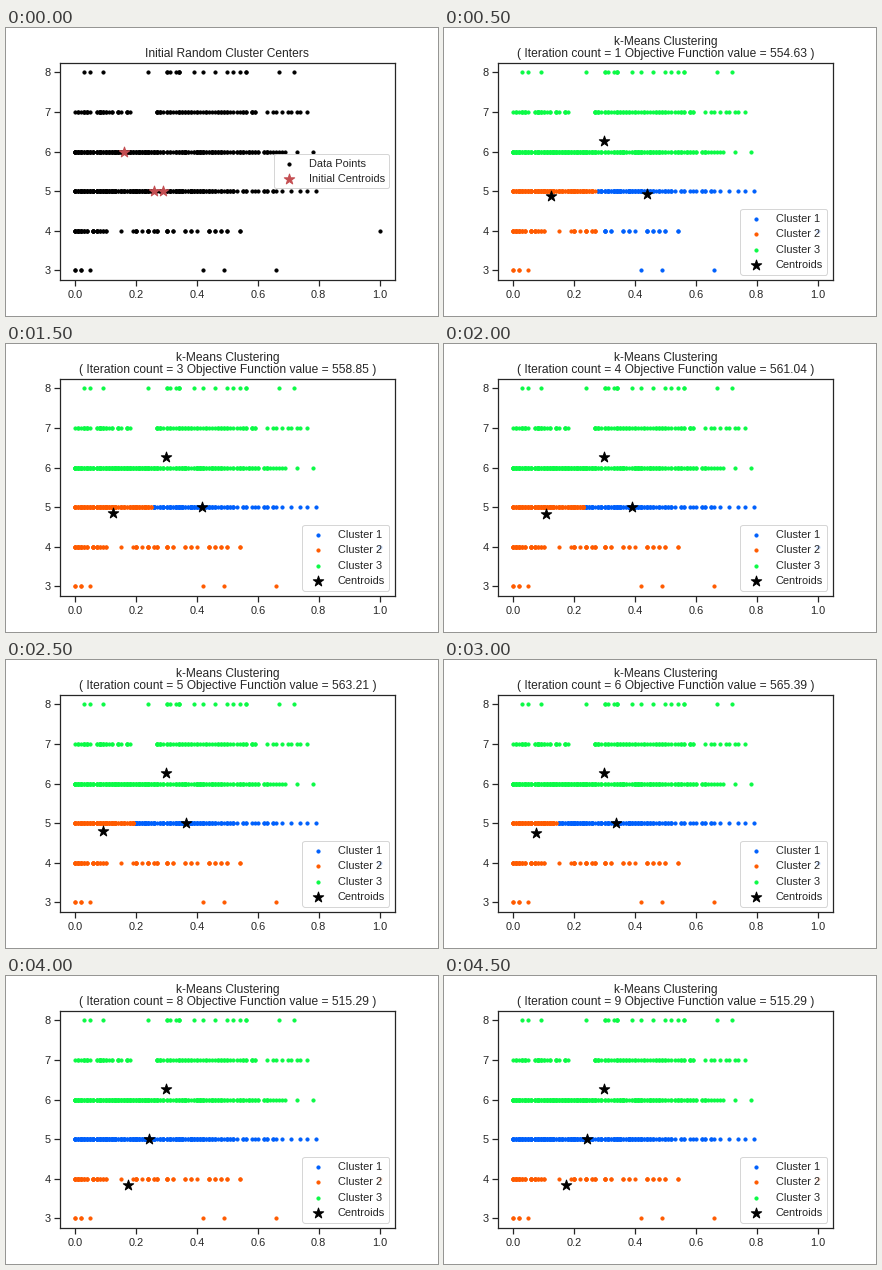
These frames come from a looping animation (432x288 px, 5000 ms). A matplotlib script:

```python
import numpy as np
import matplotlib.pyplot as plt
from matplotlib.animation import FuncAnimation

INK = "0.15"
COLORS = ["#0060fc", "#ff5b00", "#0cfa46"]
STEPS = 10

plt.rcParams.update({
    "font.family": "Liberation Sans", "font.size": 12,
    "text.color": INK, "xtick.color": INK, "ytick.color": INK,
    "axes.edgecolor": INK, "axes.linewidth": 1.25, "axes.titlesize": 12,
    "xtick.labelsize": 11, "ytick.labelsize": 11, "legend.fontsize": 11,
    "xtick.major.size": 6, "ytick.major.size": 6,
    "xtick.major.width": 1.25, "ytick.major.width": 1.25,
    "lines.linewidth": 1.5, "patch.linewidth": 1,
})

# Evenly spread runs per row: first and last hundredth, count
RUNS = {
    3: [(0, 5, 3), (42, 49, 2), (66, 66, 1)],
    4: [(0, 10, 10), (15, 19, 2), (20, 26, 4), (27, 32, 3), (36, 40, 3),
        (44, 50, 4), (54, 100, 2)],
    5: [(0, 53, 54), (55, 66, 9), (68, 79, 5)],
    6: [(0, 60, 61), (62, 69, 8), (73, 78, 2)],
    7: [(0, 12, 12), (14, 18, 4), (27, 56, 30), (58, 59, 2), (63, 76, 9)],
    8: [(3, 5, 2), (9, 24, 2), (30, 34, 4), (39, 46, 3), (50, 56, 4),
        (67, 72, 2)],
}


def make_points():
    """Repeat positions at random, most often in the middle rows."""
    rng = np.random.default_rng(4)
    pts = []
    for y, runs in RUNS.items():
        for run in runs:
            for x in np.linspace(*run).round() / 100:
                mean = 6 * np.exp(-(y - 5.5) ** 2 / 2) * max(0, 1 - 1.4 * x)
                pts += [(x, y)] * (1 + rng.poisson(mean))
    return np.array(pts)


def between(step, keys):
    return np.interp(step, list(keys), list(keys.values()))


def centers(step):
    if step == 0:
        return np.array([(0.29, 5), (0.26, 5), (0.16, 6)])
    x1 = between(step, {1: 0.44, 2: 0.436, 3: 0.418, 7: 0.312, 8: 0.243})
    y1 = between(step, {1: 4.93, 3: 5})
    x2 = between(step, {1: 0.124, 3: 0.124, 6: 0.075, 7: 0.069, 8: 0.174})
    y2 = between(step, {1: 4.87, 3: 4.85, 6: 4.755, 7: 4.66, 8: 3.84})
    return np.array([(x1, y1), (x2, y2), (0.298, 6.26)])


def score(step):
    return between(step, {1: 554.63, 3: 558.85, 4: 561.04, 6: 565.39,
                          7: 567.47, 8: 515.29})


def nearest(mids):
    gaps = POINTS[:, None, :] - mids[None, :, :]
    return (gaps ** 2).sum(axis=2).argmin(axis=1)


def dots(pts, color, label):
    ax.scatter(*pts.T, s=10, color=color, label=label)


def stars(pts, color, label):
    ax.scatter(*pts.T, s=120, marker="*", color=color, label=label)


def draw(step):
    ax.clear()
    if step == 0:
        dots(POINTS, "black", "Data Points")
        stars(centers(0), "#c44e52", "Initial Centroids")
        title = "Initial Random Cluster Centers"
        place = "center right"
    else:
        owner = nearest(centers(step - 1))
        for k, color in enumerate(COLORS):
            dots(POINTS[owner == k], color, f"Cluster {k + 1}")
        stars(centers(step), "black", "Centroids")
        title = (f"k-Means Clustering\n( Iteration count = {step} "
                 f"Objective Function value = {score(step):.2f} )")
        place = "lower right"
    ax.set_title(title, linespacing=1.0)
    ax.set_xlim(-0.05, 1.05)
    ax.set_ylim(2.75, 8.25)
    ax.set_xticks(np.arange(6) / 5)
    ax.set_yticks(range(3, 9))
    ax.legend(loc=place)
    return ax.get_children()


POINTS = make_points()
fig, ax = plt.subplots(figsize=(6, 4), dpi=72, facecolor="white")
fig.subplots_adjust(left=0.125, right=0.9, bottom=0.125, top=0.88)

anim = FuncAnimation(fig, draw, frames=STEPS, interval=500,
                     repeat=True, repeat_delay=0)
plt.show()
```
